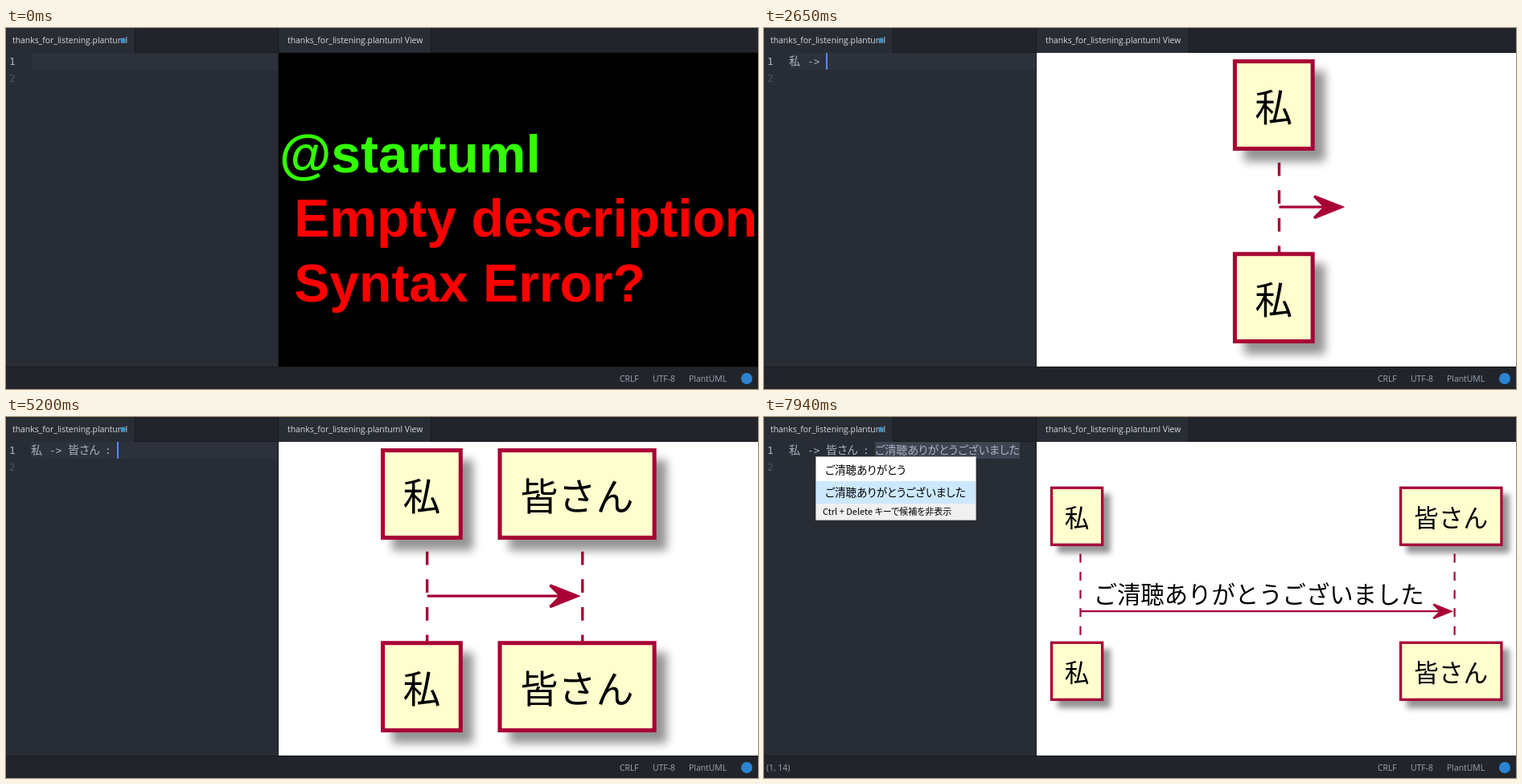
Recreate the animation shown at these times as an HTML page. Size 935 by 450 pixels, loop 8 s.

```html
<!DOCTYPE html>
<html lang="ja">
<head>
<meta charset="utf-8">
<title>Sequence diagram live preview</title>
<style>
html, body { margin: 0; width: 100%; height: 100%; overflow: hidden; background: #282c34; }
svg { display: block; width: 935px; height: 450px; }
text { white-space: pre; }
.ui { font: 10.4px "Open Sans", "Noto Sans", sans-serif; fill: #9da5b4; }
.tab { fill: #d7dae0; }
.code { font: 12.7px "DejaVu Sans Mono", monospace; fill: #abb2bf; }
.kana { font: 300 14px "Noto Sans CJK JP", "Noto Sans CJK", sans-serif; font-feature-settings: "palt"; fill: #abb2bf; }
.item { font-weight: 400; font-size: 13.6px; fill: #000; }
.hint { font-weight: 400; font-size: 11px; fill: #000; }
.err { font-family: "Liberation Sans", "Noto Sans CJK JP", "Noto Sans CJK", sans-serif; font-weight: 700; }
.uml { font-family: "Noto Sans CJK JP", "Noto Sans CJK", sans-serif; font-weight: 500; }
</style>
</head>
<body>
<svg viewBox="0 0 935 450">
  <defs>
    <clipPath id="pane"><rect x="339" y="31" width="596" height="391"/></clipPath>
    <filter id="soft" x="-30%" y="-30%" width="160%" height="160%"><feGaussianBlur stdDeviation="1.7"/></filter>
  </defs>
  <rect width="935" height="450" fill="#21252b"/>
  <rect y="30" width="935" height="1" fill="#181a1f"/>
  <rect width="160" height="31" fill="#282c34"/>
  <rect x="160" width="1" height="30" fill="#181a1f"/>
  <rect x="339" width="189" height="31" fill="#282c34"/>
  <rect x="528" width="1" height="30" fill="#181a1f"/>
  <rect y="31" width="338" height="391" fill="#282c34"/>
  <rect x="338" width="1" height="422" fill="#181a1f"/>
  <rect y="422" width="935" height="1" fill="#181a1f"/>
  <text class="ui tab" x="8" y="19">thanks_for_listening.plantuml</text>
  <circle cx="145.5" cy="15.5" r="3.2" fill="#3f8fc0"/>
  <text class="ui tab" x="350" y="19">thanks_for_listening.plantuml View</text>
  <text class="ui" x="763" y="441">CRLF</text>
  <text class="ui" x="804" y="441">UTF-8</text>
  <text class="ui" x="849" y="441">PlantUML</text>
  <circle cx="921" cy="437" r="7" fill="#2b84d3"/>
  <rect id="row" x="32" y="31" width="306" height="21" fill="#2c313c"/>
  <rect id="mark" y="31" height="21" fill="#3e4451"/>
  <text class="code" x="4" y="46">1</text>
  <text class="code" x="4" y="67" style="fill:#4b5364">2</text>
  <g id="line"></g>
  <rect id="caret" y="31" width="2" height="21" fill="#528bff"/>
  <text id="status" class="ui" y="441"></text>
  <g id="view" clip-path="url(#pane)"></g>
  <g id="popup"></g>
</svg>
<script>
const LOOP = 8000, LAG = 80;
const COLS = [31, 54, 77, 123, 138];
const TO = '私 -> ', SAY = '私 -> 皆さん : ';
const THANKS = 'ご清聴ありがとう', THANKS_LONG = THANKS + 'ございました';

// time, committed text, text still being composed
const edits = [[0, '', '']];
const compose = (done, steps) => steps.forEach(([t, s]) => edits.push([t, done, s]));
const commit = (...steps) => steps.forEach(([t, s]) => edits.push([t, s, '']));
compose('', [[170, 'ｗ'], [260, 'わ'], [350, 'わｔ'], [450, 'わた'], [570, 'わたｓ'], [680, 'わたし'], [930, '私']]);
commit([1180, '私'], [1710, '私 '], [1780, '私 -'], [2170, '私 ->'], [2650, TO]);
compose(TO, [[3120, 'ｍ'], [3220, 'み'], [3320, 'みｎ'], [3430, 'みな'], [3550, 'みなｓ'],
  [3730, 'みなさ'], [3820, 'みなさｎ'], [3910, 'みなさん'], [4050, '皆さん']]);
commit([4270, TO + '皆さん'], [4730, TO + '皆さん '], [4970, TO + '皆さん :'], [5200, SAY]);
compose(SAY, [[5670, 'ｇ'], [5760, 'ご'], [5850, 'ごｓ'], [5940, 'ごせ'], [6040, 'ごせい'], [6140, 'ごせいｔ'],
  [6230, 'ごせいｔｙ'], [6340, 'ごせいちょ'], [6600, 'ごせいちょう'], [7000, 'ごせいちょうあ'],
  [7200, 'ごせいちょうあり'], [7490, THANKS], [7860, THANKS_LONG]]);

const $ = id => document.getElementById(id);
const editAt = t => edits.findLast(e => e[0] <= t) || edits[0];
const label = (x, y, s, cls, extra = '') =>
  `<text x="${x}" y="${y}" class="${cls}" ${extra}>${s.replace(/[<>]/g, c => c === '<' ? '&lt;' : '&gt;')}</text>`;

const green = s => [s, '#3f0'], red = s => [s, '#f00'], white = s => [s, '#fff'];

// Rows of [text, colour], centred vertically; messages are indented by a space
function errorView(rows, size, x = 340, spacing = 0) {
  return '<rect x="339" y="31" width="596" height="391"/>' + rows.map(([s, color], i) => {
    const code = color === '#3f0';
    const y = 226 + size * (.52 + 1.22 * (i - (rows.length - 1) / 2));
    return label(code ? x : x + size * .278, y, s, 'err',
      `font-size="${size}" fill="${color}" letter-spacing="${code ? 0 : spacing * size}"` +
      (s.startsWith('Did') ? ' font-style="italic"' : ''));
  }).join('');
}

// Diagram in PlantUML units, scaled to fit the pane
function diagram(me, you, msg) {
  const INK = '#a80036', GAP = 5.3;
  const w1 = 14 * me.length + 16, w2 = you ? 14 * you.length + 16.4 : 0;
  const span = msg ? 13.4 * msg.length + 24.7 : 0;
  const x2 = Math.max(w1 + 13.3, w1 / 2 + span - w2 / 2);
  const W = you ? x2 + w2 + 15.5 : 47.6, H = msg ? 132.5 : 116.4;
  const k = Math.min(596 / W, 391 / H);
  const foot = msg ? 88.1 : 71.5, y = msg ? 70.7 : 54.5;
  const from = w1 / 2 + 2, to = x2 + w2 / 2 + 2;
  const tip = you ? to - 2 : from + 23;

  const box = (x, top, w, s) => `
    <rect x="${x + 4}" y="${top + 4}" width="${w}" height="33.6" opacity=".42" filter="url(#soft)"/>
    <rect x="${x + .6}" y="${top + .45}" width="${w - 1.2}" height="32.4" fill="#fefece" stroke="${INK}" stroke-width="1.5"/>` +
    label(x + w / 2, top + 22.5, s, 'uml', 'font-size="14" text-anchor="middle"');
  const life = x => `<path d="M${x} 38V${foot}" stroke="${INK}" stroke-dasharray="5 ${GAP}"/>`;
  const actor = (x, w, s, mid) => life(mid) + box(x, 0, w, s) + box(x, foot, w, s);

  return `<rect x="339" y="31" width="596" height="391" fill="#fff"/>
    <g transform="translate(${637 - W * k / 2} ${226.5 - H * k / 2}) scale(${k}) translate(7.85 2.7)">
    ${actor(0, w1, me, from)}${you ? actor(x2, w2, you, to) : ''}
    <path d="M${from} ${y}H${tip - 4}" stroke="${INK}"/>
    <path d="M${tip} ${y}l-10 -4l4 4l-4 4z" fill="${INK}" stroke="${INK}"/>
    ${msg ? label(from + 7.4, 66, msg, 'uml', 'font-size="13.4"') : ''}</g>`;
}

function preview(source) {
  const s = source.trim(), start = green('@startuml');
  if (!s) return errorView([start, red('Empty description'), red('Syntax Error?')], 66);
  if (s.endsWith(' -')) {
    const hints = ['>', '-', '\\'].map(c => white(s + c));
    return errorView([start, green(s), red('Syntax Error?'), white('Did you mean:'), ...hints], 42, 487);
  }
  const [me, arrow, you, , msg] = s.split(' ');
  if (arrow) return diagram(me, you, msg);
  const n = me.length;
  const size = 591 / (7.446 + n + .018 * (15 + n));
  return errorView([start, green(me), red('Forbidden line ' + me)], size, 340, .018);
}

function drawLine(done, comp, idle) {
  const words = (done + comp).split(' ');
  $('line').innerHTML = words.map((s, i) => label(COLS[i], 46, s, /^[->:]*$/.test(s) ? 'code' : 'kana')).join('');
  const x = COLS[words.length - 1];
  const width = $('line').lastElementChild.getComputedTextLength();
  const show = (id, on) => $(id).setAttribute('visibility', on ? 'visible' : 'hidden');
  show('row', !comp);
  show('caret', !comp && !idle);
  show('mark', comp);
  $('caret').setAttribute('x', x + width);
  $('mark').setAttribute('x', x);
  $('mark').setAttribute('width', width);
  $('status').setAttribute('x', done === SAY ? 3 : -3);
  $('status').textContent = comp ? `(1, ${comp.length})` : '';
}

function popup(t) {
  if (t < 7000) return '';
  const pick = t < 7490 ? -1 : t < 7860 ? 0 : 1;
  const x = pick < 0 ? 120 : 64;
  const hint = pick < 0 ? 'Tab キーで予測候補を選択' : 'Ctrl + Delete キーで候補を非表示';
  return `<rect x="${x + .5}" y="49.5" width="199" height="79" fill="#fff" stroke="#a8a8a8"/>
    ${pick < 0 ? '' : `<rect x="${x + 1}" y="${52 + 28 * pick}" width="198" height="28" fill="#cce8ff"/>`}
    <rect x="${x + 1}" y="108" width="198" height="20" fill="#f0f0f0"/>` +
    label(x + 12, 71, THANKS, 'kana item') + label(x + 12, 99, THANKS_LONG, 'kana item') +
    label(x + 9, 122, hint, 'kana hint');
}

let lastEdit, lastSource;
function frame() {
  const t = performance.now() % LOOP;
  const edit = editAt(t);
  if (edit !== lastEdit) {
    lastEdit = edit;
    drawLine(edit[1], edit[2], edit[0] === 0);
    $('popup').innerHTML = popup(t);
  }
  // committing the first word empties the buffer for a moment
  const [, done, comp] = editAt(t - LAG);
  const source = t >= 1180 && t < 1240 ? '' : done + comp;
  if (source !== lastSource) {
    lastSource = source;
    $('view').innerHTML = preview(source);
  }
  requestAnimationFrame(frame);
}
frame();
</script>
</body>
</html>
```
